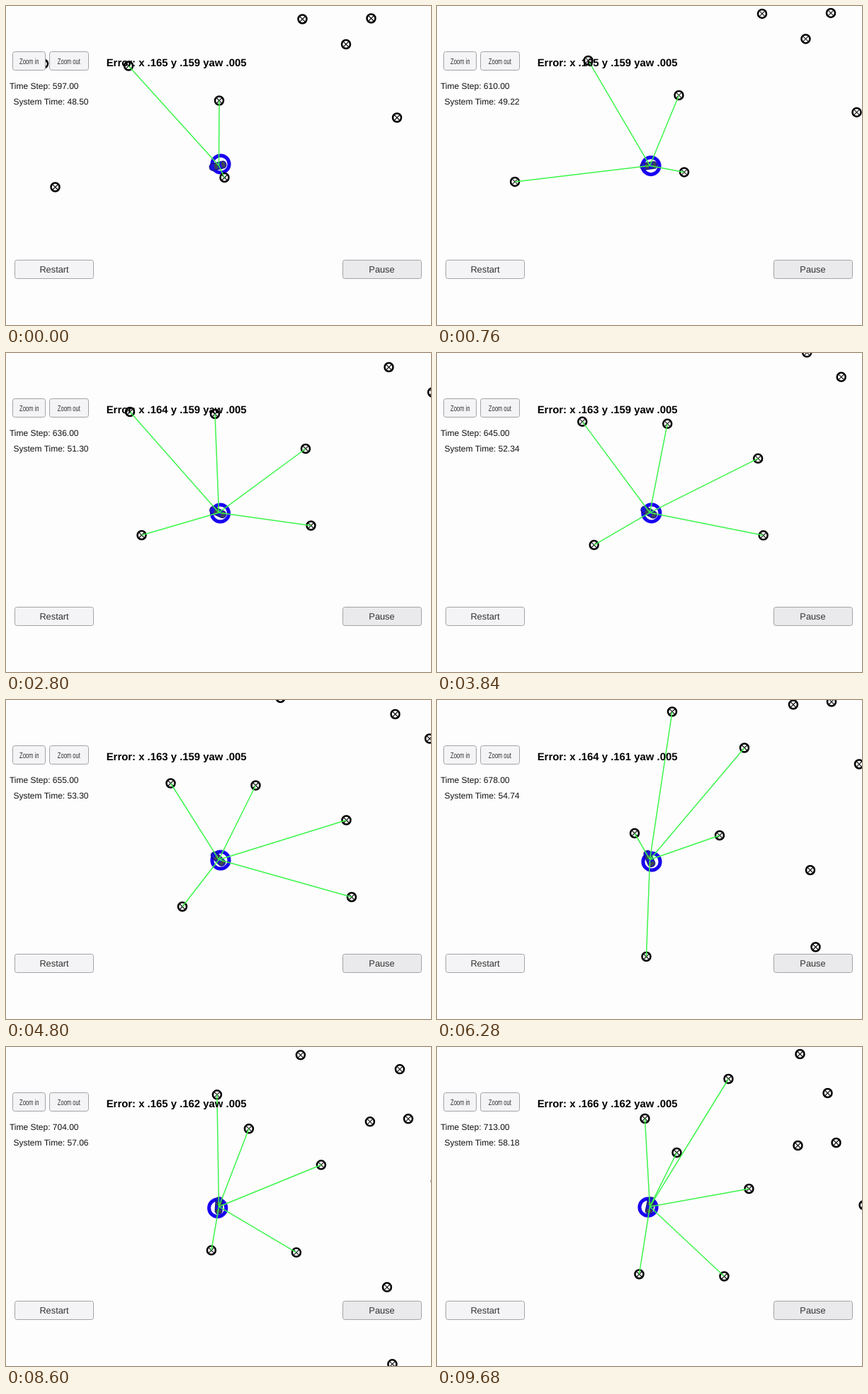
An HTML page with a canvas for the animation above (9.72 s loop, 600 by 450 pixels).

```html
<!DOCTYPE html>
<html lang="en">
<head>
<meta charset="utf-8">
<title>Localization simulator</title>
<style>
  html, body { margin: 0; width: 100%; height: 100%; overflow: hidden; background: #fefdfe; }
  canvas, svg { position: absolute; left: 0; top: 0; display: block; }
  text {
    font-family: "Liberation Sans", Arial, sans-serif; font-size: 12px;
    fill: #111; white-space: pre; text-rendering: geometricPrecision;
  }
  .error { font-size: 14.9px; font-weight: bold; fill: #000; }
  .button rect { fill: #f4f3f5; stroke: #a3a2a5; rx: 3px; }
  .button text { font-size: 12.8px; text-anchor: middle; fill: #323232; }
  .button .narrow { font-size: 11.5px; transform: scaleX(.66); }
  .button.lit rect { fill: #eae9eb; }
</style>
</head>
<body>
<canvas id="scene" width="600" height="450"></canvas>
<svg width="600" height="450" viewBox="0 0 600 450">
  <g class="button"><rect x="9.5" y="64.5" width="46" height="26"/>
    <g transform="translate(32.7 82)"><text class="narrow">Zoom in</text></g></g>
  <g class="button"><rect x="61.5" y="64.5" width="55" height="26"/>
    <g transform="translate(88.8 82)"><text class="narrow">Zoom out</text></g></g>
  <g class="button"><rect x="12.5" y="358.5" width="111" height="26"/>
    <text x="68" y="375.7">Restart</text></g>
  <g class="button lit"><rect x="475.5" y="358.5" width="111" height="26"/>
    <text x="530.5" y="375.7">Pause</text></g>
  <text id="error" class="error" x="141.7" y="85"></text>
  <text id="step" x="4.9" y="117"></text>
  <text id="clock" x="10.5" y="139"></text>
</svg>
<script>
const LOOP = 9720, TICK = 40, RANGE = 220;
const CAR = [300.5, 225.2];

const landmarks = [
  [418.5, 18.5], [515.5, 17.5], [480, 54], [552, 157.5], [173, 84.5], [301, 133.5],
  [308.5, 242], [69.5, 255.5], [53, 81.5], [208, -39], [370, -16], [106, -90],
  [277, -100], [331, -104], [61, -138], [179, -194], [280, -229], [319, -174]
];

// seconds, time step, view offset x and y, ring offset x and y
const keys = [
  [0, 597, 0, 0, 3, -2],
  [1.56, 622, 78, -10, 1.5, 2],
  [2.8, 636, 122, 1.5, 2.5, 1],
  [4.8, 655, 179.5, 36, 3, 1],
  [6.28, 678, 226, 106.5, 3, 3],
  [7.52, 694, 237, 166, 0, 3],
  [9.68, 713, 232.5, 239, -2, 1]
];

const ctx = document.getElementById("scene").getContext("2d");
const [errorText, stepText, clockText] =
  ["error", "step", "clock"].map(id => document.getElementById(id));

function slope(i, j, col) {
  return (keys[j][col] - keys[i][col]) / (keys[j][0] - keys[i][0]);
}

function tangent(i, col) {
  const last = keys.length - 1;
  if (i === 0) return 2 * slope(0, 1, col) - tangent(1, col);
  if (i === last) return 2 * slope(last - 1, last, col) - tangent(last - 1, col);
  return slope(i - 1, i + 1, col);
}

// Smooth curve through the keys
function spline(s, col) {
  let i = 0;
  while (i < keys.length - 2 && s >= keys[i + 1][0]) i++;
  const span = keys[i + 1][0] - keys[i][0], u = (s - keys[i][0]) / span;
  const p = keys[i][col], d = keys[i + 1][col] - p;
  const m = tangent(i, col) * span, n = tangent(i + 1, col) * span;
  return p + u * (m + u * (3 * d - 2 * m - n + u * (m + n - 2 * d)));
}

function circle(x, y, r, width, color) {
  ctx.beginPath();
  ctx.arc(x, y, r, 0, Math.PI * 2);
  ctx.lineWidth = width;
  ctx.strokeStyle = color;
  ctx.stroke();
}

function line(x1, y1, x2, y2, width, color) {
  ctx.beginPath();
  ctx.moveTo(x1, y1);
  ctx.lineTo(x2, y2);
  ctx.lineWidth = width;
  ctx.strokeStyle = color;
  ctx.stroke();
}

function box(x, y, w, h, r, color) {
  ctx.beginPath();
  ctx.roundRect(x, y, w, h, r);
  ctx.fillStyle = color;
  ctx.fill();
}

function marker(x, y) {
  circle(x, y, 6, 2.5, "#000");
  line(x - 4, y - 4, x + 4, y + 4, 1.1, "#111");
  line(x - 4, y + 4, x + 4, y - 4, 1.1, "#111");
}

function car(angle) {
  ctx.save();
  ctx.translate(...CAR);
  ctx.rotate(angle);
  box(-11, -5.5, 25, 11, 5, "#15157a");
  box(-10, -4.5, 23, 9, 4, "#1c14d8");
  box(1.5, -4, 5, 8, 1.5, "#3d4652");
  box(-9, -4, 5, 8, 1.5, "#3d4652");
  ctx.restore();
}

function draw(s) {
  const [step, dx, dy, ringX, ringY] = [1, 2, 3, 4, 5].map(col => spline(s, col));
  const [vx, vy] = [2, 3].map(col => spline(s + .02, col) - spline(s - .02, col));
  const spots = landmarks.map(([x, y]) => [x + dx, y + dy]);

  ctx.clearRect(0, 0, 600, 450);
  circle(300 + ringX, 225 + ringY, 12.1, 5, "#1800f0");
  car(Math.atan2(-vy, -vx));
  spots.forEach(p => marker(...p));
  spots
    .filter(([x, y]) => Math.hypot(x - CAR[0], y - CAR[1]) < RANGE)
    .forEach(p => line(...CAR, ...p, 1.5, "#3cf54a"));

  const ex = Math.round(163.42 + .108 * (s - 4.35) ** 2);
  const ey = Math.round(160.26 + 1.25 * Math.tanh(s - 5.6));
  const clock = 48.5 + Math.floor(s / .08 + .01) * .08;
  errorText.textContent = `Error: x .${ex} y .${ey} yaw .005`;
  stepText.textContent = `Time Step: ${Math.floor(step + .01).toFixed(2)}`;
  clockText.textContent = `System Time: ${clock.toFixed(2)}`;
}

const start = performance.now();
function frame() {
  const t = (performance.now() - start) % LOOP;
  draw(Math.floor(t / TICK) * TICK / 1000);
  requestAnimationFrame(frame);
}
frame();
</script>
</body>
</html>
```
